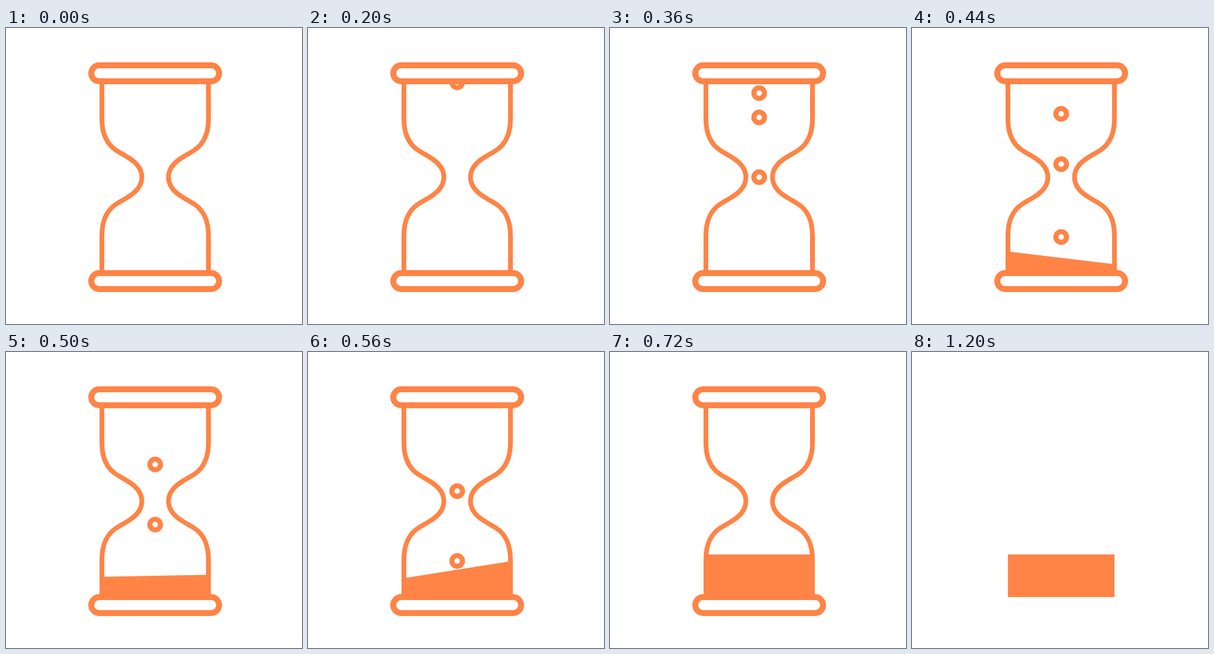
These frames come from a looping animation (500 px wide and 500 px high, 1220 ms). An HTML page:

```html
<!DOCTYPE html>
<html lang="en">
<head>
<meta charset="utf-8">
<title>Hourglass</title>
<style>
  html, body { margin: 0; width: 100%; height: 100%; overflow: hidden; background: #fff; }
  svg { display: block; width: 100vw; height: 100vh; }

  .line { fill: none; stroke: #ff8446; stroke-width: 8; }
  .cap { fill: #fff; stroke: #ff8446; stroke-width: 10; }
  .drop { fill: #fff; stroke: #ff8446; stroke-width: 8.5; }
  .sand { fill: #ff8446; }

  .shell, .drop, .sand { animation: 1220ms infinite; }
  .shell { animation-name: blink; animation-timing-function: step-end; }
  .a { animation-name: fall-a; }
  .b { animation-name: fall-b; }
  .c { animation-name: fall-c; }
  .sand { animation-name: fill; }

  /* One step lasts 20 ms, which is 1.639 % of the loop. */
  @keyframes blink {
    0% { opacity: 1; }
    98.36%, 100% { opacity: 0; }
  }
  @keyframes fall-a {
    0%, 14.754% { transform: translateY(77px); animation-timing-function: steps(5); }
    22.95% { transform: translateY(151px); animation-timing-function: steps(4); }
    29.508% { transform: translateY(252px); animation-timing-function: steps(4); }
    36.065% { transform: translateY(353px); animation-timing-function: steps(3); }
    40.983%, 100% { transform: translateY(428px); }
  }
  @keyframes fall-b {
    0%, 18.032% { transform: translateY(77px); animation-timing-function: steps(3); }
    22.95% { transform: translateY(107px); animation-timing-function: steps(4); }
    29.508% { transform: translateY(151px); animation-timing-function: steps(4); }
    36.065% { transform: translateY(230px); animation-timing-function: steps(6); }
    45.901% { transform: translateY(353px); animation-timing-function: steps(4); }
    52.459%, 100% { transform: translateY(428px); }
  }
  @keyframes fall-c {
    0%, 24.59% { transform: translateY(77px); animation-timing-function: steps(3); }
    29.508% { transform: translateY(110px); animation-timing-function: steps(4); }
    36.065% { transform: translateY(145px); animation-timing-function: steps(6); }
    45.901% { transform: translateY(235px); animation-timing-function: steps(5); }
    54.098% { transform: translateY(353px); animation-timing-function: steps(3); }
    59.016%, 100% { transform: translateY(428px); }
  }
  @keyframes fill {
    0%, 29.508% { d: path("M162 414 L162 414 L342 414 L342 414 Z"); animation-timing-function: steps(4); }
    36.065% { d: path("M162 414 L162 377.5 L342 399 L342 414 Z"); animation-timing-function: steps(6); }
    45.901% { d: path("M162 414 L162 382 L342 353.5 L342 414 Z"); animation-timing-function: steps(8); }
    59.016%, 100% { d: path("M162 414 L162 342 L342 342 L342 414 Z"); }
  }
</style>
</head>
<body>
<svg viewBox="0 0 500 500">
  <defs>
    <path id="side" d="M162 90V153C162 178 170 196 186 206.500C193 211 199 214 206 218.500C221 227.500 229.500 238 229.500 252S221 276.500 206 285.500C199 290 193 293 186 297.500C170 308 162 326 162 351V414"/>
  </defs>
  <g class="shell">
    <circle class="drop a" cx="252" r="9"/>
    <circle class="drop b" cx="252" r="9"/>
    <circle class="drop c" cx="252" r="9"/>
  </g>
  <path class="sand" d="M162 414 L162 414 L342 414 L342 414 Z"/>
  <g class="shell">
    <use class="line" href="#side"/>
    <use class="line" href="#side" transform="matrix(-1 0 0 1 504 0)"/>
    <rect class="cap" x="144" y="63" width="216" height="27" rx="13.5"/>
    <rect class="cap" x="144" y="414" width="216" height="27" rx="13.5"/>
  </g>
</svg>
</body>
</html>
```
